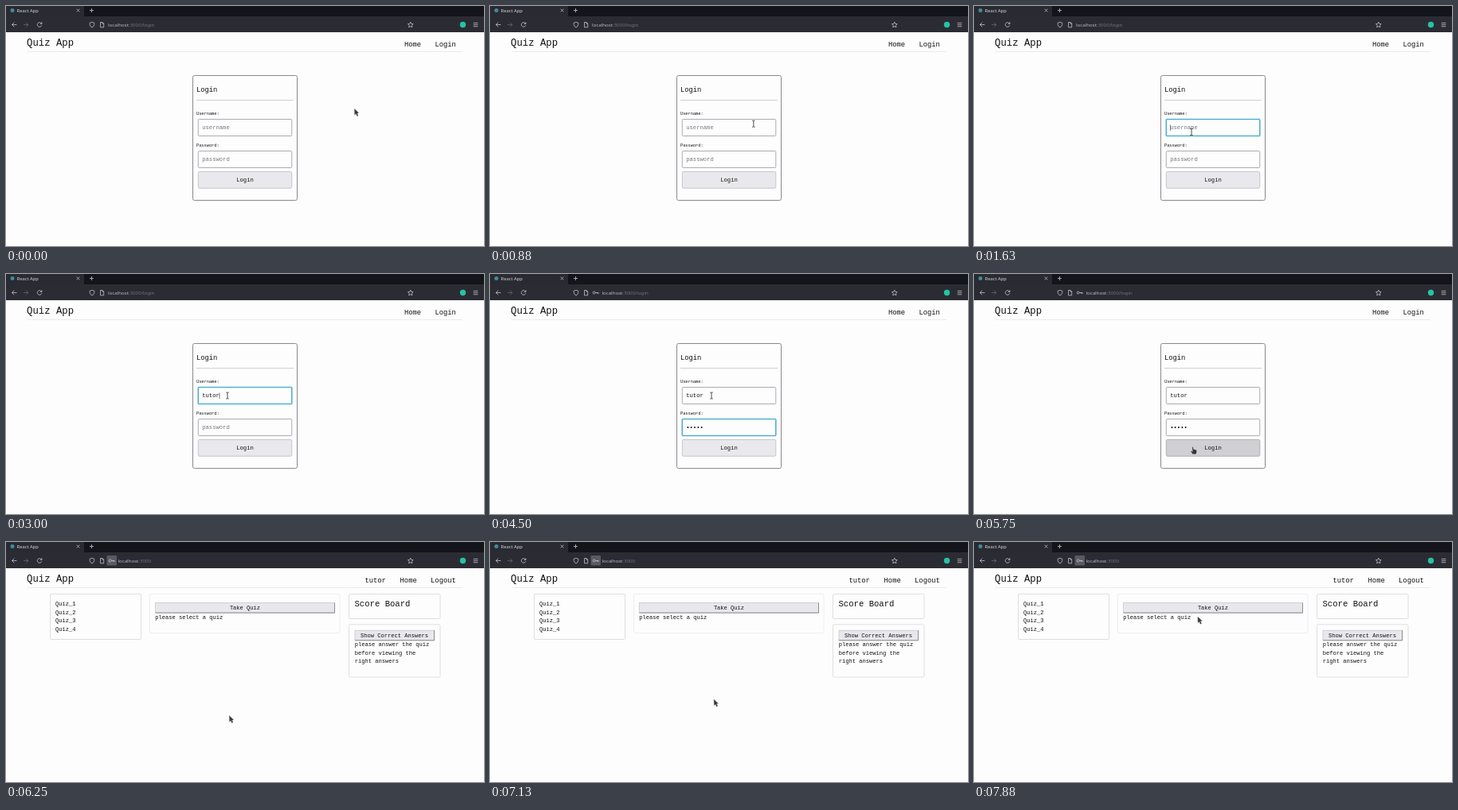
An HTML page for the animation above (8 s loop, 600x302 px).

```html
<!DOCTYPE html>
<html lang="en">
<head>
<meta charset="utf-8">
<title>Quiz login</title>
<style>
  html, body { margin: 0; width: 100%; height: 100%; overflow: hidden; background: #fefdfe; }
  svg { display: block; width: 600px; height: 302px; }
  text { font-family: "Liberation Mono", monospace; fill: #111; white-space: pre; }
  .ui { font-family: "Noto Sans", sans-serif; }
  .h1 { font-size: 12.3px; }
  .h2 { font-size: 10.6px; }
  .h3 { font-size: 8.8px; }
  .body { font-size: 7.08px; }
  .field { font-size: 7.2px; }
  .label { font-size: 5.3px; }
  .mid { text-anchor: middle; }
  .icon { fill: none; stroke: #c4c4c9; stroke-width: .8; }
  .card { fill: #fefdfe; stroke: #dedee0; }
  .glow { fill: none; stroke: #a5dbee; stroke-width: 2.4; opacity: .45; }
  .ring { fill: none; stroke: #3ea9d0; stroke-width: 1.1; }
</style>
</head>
<body>
<svg viewBox="0 0 600 302">
  <!-- browser bar -->
  <rect width="600" height="14" fill="#14151b"/>
  <rect width="98" height="14" fill="#2a2b32"/>
  <rect y="13" width="600" height="20" fill="#2b2c33"/>
  <circle cx="8" cy="5.500" r="2.500" fill="#3f8c9c"/>
  <text class="ui" x="13.600" y="7.800" font-size="5.800" style="fill:#d4d4d8">React App</text>
  <g class="icon">
    <path d="M88.700 3.700l3.600 3.600m0-3.600l-3.600 3.600M107.500 3v5m-2.500-2.500h5"/>
    <path d="M13.500 23.500H7.500m2.800-2.800l-2.800 2.800l2.800 2.800"/>
    <path d="M22 23.500h6m-2.800-2.800l2.800 2.800l-2.800 2.800" stroke="#66676e"/>
    <path d="M44.500 22a2.800 2.800 0 1 0 .3 2.300M45 20.300v2.200h-2.200"/>
    <path d="M108 20.300l2.800 1v2q-.3 2.600-2.800 3.700q-2.500-1.100-2.800-3.700v-2z"/>
    <path d="M118.500 20.500h2.500l1.700 1.700v4.600h-4.200zM121 20.500v1.700h1.700"/>
    <path d="M507.800 20.200l1 2.200l2.400.3l-1.800 1.700l.5 2.400l-2.100-1.200l-2.100 1.200l.5-2.400l-1.800-1.700l2.400-.3z"/>
    <path d="M586.700 21.400h5.600m-5.600 2.200h5.600m-5.600 2.200h5.600"/>
  </g>
  <circle cx="573.500" cy="23.500" r="3.700" fill="#26c3a6"/>
  <g id="key">
    <rect id="keyBox" x="126.500" y="17" width="12.500" height="12.500" rx="1" fill="#5a5b62"/>
    <g class="icon"><circle cx="130.700" cy="23.500" r="1.500"/><path d="M132.200 23.500h4v1.500m-1.700-1.500v1.200"/></g>
  </g>
  <text class="ui" id="url" y="25.800" font-size="6.150" style="fill:#717279"><tspan fill="#b8b9bf">localhost</tspan><tspan id="path"></tspan></text>

  <!-- shared header -->
  <text class="h1" x="26.100" y="50">Quiz App</text>
  <path d="M27 57.500H573" stroke="#ebebed"/>

  <g id="loginPage">
    <text class="h3" x="500" y="51.100">Home</text>
    <text class="h3" x="538.500" y="51.100">Login</text>
    <rect x="234.500" y="87.500" width="131" height="157" rx="2" fill="#fefdfe" stroke="#7c7c81" stroke-width=".9"/>
    <text class="h3" x="238.900" y="108.200">Login</text>
    <path d="M239 118.500H361" stroke="#c9c9cc" stroke-width=".9"/>
    <text class="label" x="239" y="137.300">Username:</text>
    <text class="label" x="239" y="177.300">Password:</text>
    <g id="fields"></g>
    <rect id="button" x="241.300" y="208.400" width="117.500" height="20.800" rx="1.500" stroke-width=".9"/>
    <text class="field mid" x="300" y="220.800">Login</text>
  </g>

  <g id="quizPage">
    <text class="h3" x="450.500" y="51.100">tutor</text>
    <text class="h3" x="494.600" y="51.100">Home</text>
    <text class="h3" x="533.100" y="51.100">Logout</text>
    <g id="cards"></g>
    <g id="quizzes"></g>
    <g id="bevels"></g>
    <text class="body mid" x="300" y="84.800">Take Quiz</text>
    <text class="body" x="187.300" y="96.800">please select a quiz</text>
    <text class="h2" x="437.500" y="81.200">Score Board</text>
    <text class="body mid" x="487.600" y="119.500">Show Correct Answers</text>
    <text class="body" x="437.700" y="131">please answer the quiz</text>
    <text class="body" x="437.700" y="141.600">before viewing the</text>
    <text class="body" x="437.700" y="152.200">right answers</text>
  </g>

  <g id="mouse">
    <path id="arrow" d="M0 0l.3 7.800l1.700-1.500l1.300 3l1.500-.7l-1.300-2.900l2.100-.4z" fill="#38383e" stroke="#8a8a90" stroke-width=".4"/>
    <path id="beam" d="M-1.700-4h1.300l.4.500l.4-.5h1.300M0-3.600v7.200M-1.700 4h1.300l.4-.5l.4.500h1.300" fill="none" stroke="#222" stroke-width=".8"/>
    <path id="hand" d="M-.6 0q.8-.8 1.400.2l.5 2.600l3 .7q1 .4 1 1.500l-.4 2.300l-.6 1.600h-4.200l-2.500-3.600q.2-1 1.300-.4l1.100.8z" fill="#333338" stroke="#eee" stroke-width=".3"/>
  </g>
</svg>
<script>
const $ = id => document.getElementById(id);
const show = (el, on) => el.style.display = on ? '' : 'none';
const LOOP = 8000, STEP = 125;
const FOCUS = 1500, TAB = 3250, PRESS = 5500, SAVE = 5875, SWAP = 6250;

// Each field: box top, placeholder, value, key press times, focus span
const fields = [
  { y: 142.5, hint: 'username', value: 'tutor', keys: [2250, 2500, 2625, 2875, 3000], from: FOCUS, to: TAB },
  { y: 182.5, hint: 'password', value: '•••••', keys: [4000, 4125, 4250, 4375, 4500], from: TAB, to: PRESS }
];
$('fields').innerHTML = fields.map(({ y }, i) => {
  const box = `x="241.3" y="${y}" width="117.5" height="21" rx="1"`;
  return `<rect ${box} fill="#fefdfe" stroke="#a2a2a7" stroke-width=".9"/>
    <g id="focus${i}"><rect class="glow" ${box}/><rect class="ring" ${box}/></g>
    <text class="field" id="value${i}" x="246.200" y="${y + 12.8}"></text>
    <path id="caret${i}" d="M0 ${y + 7}v7.500" stroke="#222" stroke-width=".6"/>`;
}).join('');

$('cards').innerHTML = [[55.5, 65.5, 114, 57], [180.5, 65.5, 238.5, 49, '#eeeef0'], [430.5, 65.5, 114.5, 31], [430.5, 103.8, 114.5, 66.2]]
  .map(([x, y, w, h, c = '#dedee0']) => `<rect class="card" x="${x}" y="${y}" width="${w}" height="${h}" rx="1.5" style="stroke:${c}"/>`).join('');
$('quizzes').innerHTML = [1, 2, 3, 4]
  .map(n => `<text class="body" x="62" y="${69.3 + n * 10.6}">Quiz_${n}</text>`).join('');
$('bevels').innerHTML = [[187.5, 76.5, 225], [438, 111.2, 99.5]].map(([x, y, w]) =>
  `<rect x="${x}" y="${y}" width="${w}" height="12.6" fill="#e8e8ec" stroke="#c9c9cd" stroke-width=".8"/>
   <path d="M${x} ${y + 12.6}h${w}v-12.6" fill="none" stroke="#85858a" stroke-width=".9"/>`).join('');

// Mouse stops: time, x, y
const track = [[125, 437.3, 129.3], [1375, 273, 158.5], [1750, 273, 158.5], [2125, 278, 153],
  [5000, 278, 153], [5375, 272.3, 217.5], [5625, 272.3, 217.5], [6000, 280.2, 218.5],
  [6500, 280.2, 218.5], [7000, 281, 204], [7875, 280.8, 94]];

function mouseAt(t) {
  const i = track.findIndex(k => k[0] > t);
  if (i < 0) return track[track.length - 1].slice(1);
  if (i === 0) return track[0].slice(1);
  const [a, b] = [track[i - 1], track[i]];
  const p = (t - a[0]) / (b[0] - a[0]), e = p * p * (3 - 2 * p);
  return [a[1] + (b[1] - a[1]) * e, a[2] + (b[2] - a[2]) * e];
}

function draw(now) {
  const t = Math.floor(now % LOOP / STEP) * STEP;
  const login = t < SWAP;
  const hasKey = t >= fields[1].keys[0];
  show($('loginPage'), login);
  show($('quizPage'), !login);
  show($('key'), hasKey);
  show($('keyBox'), t >= SAVE);
  $('url').setAttribute('x', hasKey ? 140.4 : 128);
  $('path').textContent = login ? ':3000/login' : ':3000';

  fields.forEach((f, i) => {
    const n = f.keys.filter(k => k <= t).length;
    const focused = t >= f.from && t < f.to;
    const text = $('value' + i);
    text.textContent = n ? f.value.slice(0, n) : f.hint;
    text.style.fill = n ? '#111' : '#77777c';
    show($('focus' + i), focused);
    show($('caret' + i), focused && i === 0);
    $('caret' + i).setAttribute('transform', `translate(${246.4 + n * 4.32})`);
  });

  const [x, y] = mouseAt(t);
  const inX = login && x > 241 && x < 359;
  const onField = inX && fields.some(f => y > f.y && y < f.y + 21);
  const onButton = inX && y > 208 && y < 229;
  $('button').setAttribute('fill', onButton ? '#d0d0d4' : '#e9e9ed');
  $('button').setAttribute('stroke', onButton ? '#a9a9ad' : '#bfbfc3');
  $('mouse').setAttribute('transform', `translate(${x} ${y})`);
  show($('beam'), onField);
  show($('hand'), onButton);
  show($('arrow'), !onField && !onButton);
}

function tick() {
  draw(performance.now());
  requestAnimationFrame(tick);
}
tick();
</script>
</body>
</html>
```
